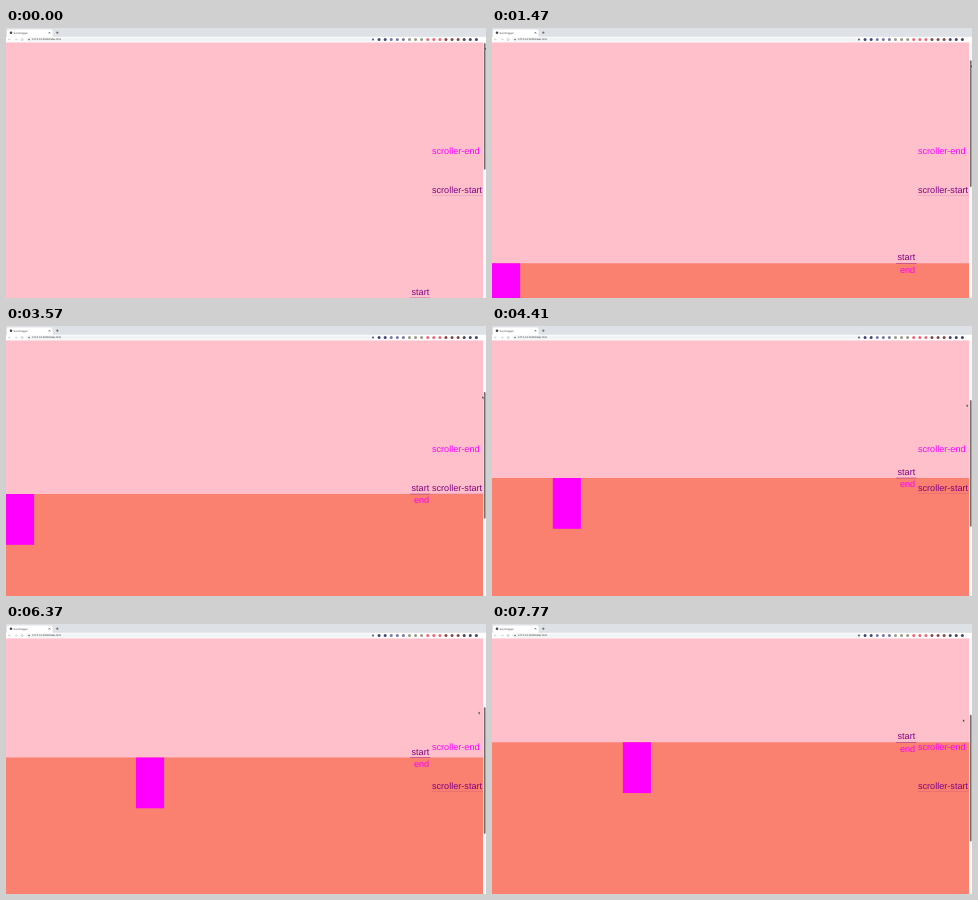
These frames come from a looping animation (480 by 270 pixels, 7.84 s). An HTML page:

```html
<!DOCTYPE html>
<html lang="en">
<head>
<meta charset="utf-8">
<title>Scroll trigger</title>
<style>
  html, body { margin: 0; width: 100%; height: 100%; overflow: hidden; }
  svg { display: block; width: 480px; height: 270px; }
  text { font-family: "Liberation Sans", Arial, sans-serif; text-rendering: geometricPrecision; }
  .marker { font-size: 9.1px; }
  .tiny { font-size: 2.5px; fill: #333; }
  .start { fill: purple; }
  .end { fill: #f0f; }
</style>
</head>
<body>
<svg viewBox="0 0 480 270">
  <rect width="480" height="270" fill="#ffc0cb"/>
  <g id="section">
    <rect width="477" height="270" fill="#fa8070"/>
    <rect id="box" width="28.1" height="50.8" fill="#f0f"/>
  </g>

  <g class="marker">
    <g id="trigger">
      <rect class="start" x="404" y="-.2" width="20.5" height=".4"/>
      <text class="start" x="423.2" y="-2.9" text-anchor="end">start</text>
      <text class="end" x="423.2" y="9.3" text-anchor="end">end</text>
    </g>
    <text class="end" x="426" y="126.2">scroller-end</text>
    <text class="start" x="426" y="165.2">scroller-start</text>
    <rect class="start" x="425.5" y="167.6" width="51.5" height=".2" opacity=".6"/>
  </g>

  <rect x="477" y="14" width="3" height="256" fill="#fafafa"/>
  <rect id="thumb" x="477.8" y="15" width="1.8" height="126.6" rx=".9" fill="#707070"/>

  <g id="chrome">
    <rect width="480" height="9" fill="#dee1e6"/>
    <path d="M1 9V3q0-1.6 1.6-1.6H45q1.6 0 1.6 1.6V9z" fill="#fff"/>
    <circle cx="5" cy="4.7" r="1.3" fill="#444"/>
    <text class="tiny" x="7.6" y="5.6">Scroll trigger</text>
    <path d="M42.7 4l1.5 1.5m0-1.5l-1.5 1.5M50 4.7h2.6m-1.3-1.3v2.6" stroke="#333" stroke-width=".5"/>
    <rect y="8.8" width="480" height="5.6" fill="#fff"/>
    <rect x="20" y="9.5" width="349" height="4.2" rx="2.1" fill="#f1f3f4"/>
    <path d="M4.6 11.5H2.4l1-1m-1 1l1 1M9 11.5h2.2l-1-1m1 1l-1 1" fill="none" stroke="#aaa" stroke-width=".4"/>
    <circle cx="16.2" cy="11.5" r="1" fill="none" stroke="#888" stroke-width=".4"/>
    <circle cx="23" cy="11.5" r=".8" fill="#666"/>
    <text class="tiny" x="26" y="12.4">127.0.0.1:5500/index.html</text>
  </g>

  <path id="cursor" d="M0 0v2.5l.6-.5.5 1 .5-.2-.5-1h.8z" fill="#111" stroke="#fff" stroke-width=".2"/>
</svg>
<script>
const LOOP = 7840, STEP = 70;
const TOP = 270; // section top before any scrolling

// [time, distance scrolled]: a short pull, a pause, then a slowing drag
const scrollKeys = [
  [0, 0], [840, 16], [1000, 16], [2380, 71], [3570, 102],
  [4410, 118], [5880, 136], [6370, 136.5], [LOOP, 152.5]
];
const slide = { begin: 3605, duration: 3000, distance: 130.8 };

const $ = id => document.getElementById(id);
const move = (id, x, y) => $(id).setAttribute("transform", `translate(${x} ${y})`);
const clamp = v => Math.min(1, Math.max(0, v));
const easeOut = p => 1 - (1 - p) ** 2;

function sample(keys, t) {
  const i = Math.max(1, keys.findIndex(k => k[0] >= t));
  const [t0, a] = keys[i - 1], [t1, b] = keys[i];
  return a + (b - a) * clamp((t - t0) / (t1 - t0));
}

// toolbar buttons, evenly spaced, three to a colour
const palette = ["#447", "#77a", "#998", "#e67", "#844", "#446"];
for (let i = 0; i < palette.length * 3; i++) {
  const dot = document.createElementNS("http://www.w3.org/2000/svg", "circle");
  const attrs = { cx: 367 + i * 6.08, cy: 11.5, r: i ? 1.5 : 0.9, fill: palette[Math.floor(i / 3)] };
  for (const name in attrs) dot.setAttribute(name, attrs[name]);
  $("chrome").append(dot);
}

function draw(t) {
  const scroll = sample(scrollKeys, t);
  const drag = scroll / 2; // the page is twice as tall as the window
  move("section", 0, TOP - scroll);
  move("trigger", 0, TOP - scroll);
  move("box", slide.distance * easeOut(clamp((t - slide.begin) / slide.duration)), 0);
  move("thumb", 0, drag);
  // the hand drifts left late in the drag
  move("cursor", 478.6 - 0.215 * Math.max(0, drag - 40), 19.3 + drag);
}

const origin = performance.now();
function tick() {
  const t = (performance.now() - origin) % LOOP;
  draw(Math.floor(t / STEP) * STEP);
  requestAnimationFrame(tick);
}
tick();
</script>
</body>
</html>
```
